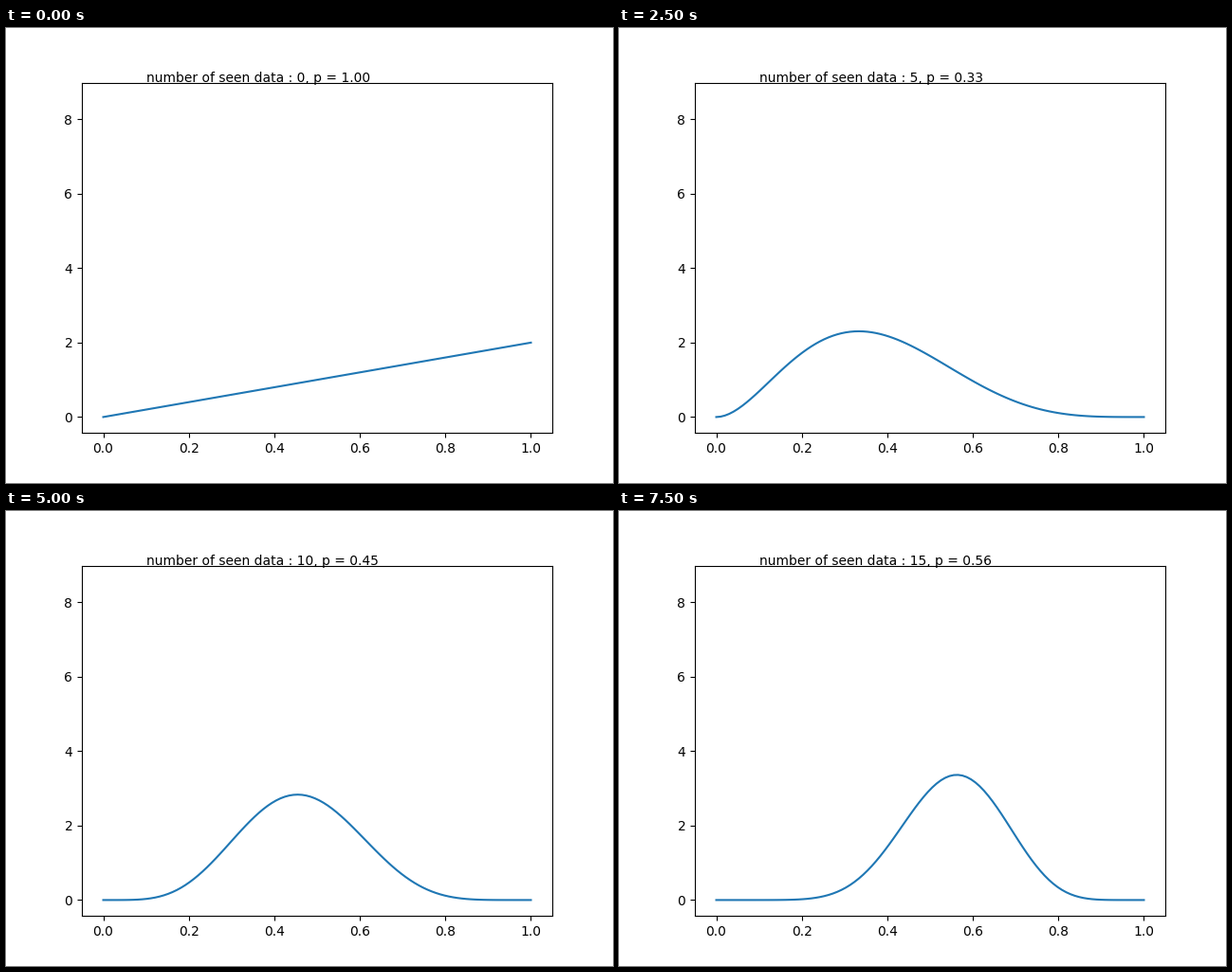
These frames come from a looping animation (640 by 480 pixels, 8 s). A matplotlib script:

```python
from math import factorial

import matplotlib.pyplot as plt
import numpy as np
from matplotlib.animation import FuncAnimation

FLIPS = "HTTHTTHHTTHHHTHH"
TOP = 8.56
x = np.linspace(0, 1, 100)


def posterior(heads, tails):
    """Beta density of the coin bias under a uniform prior."""
    scale = factorial(heads + tails + 1) / (factorial(heads) * factorial(tails))
    return scale * x**heads * (1 - x)**tails


fig, ax = plt.subplots(figsize=(6.4, 4.8), dpi=100)
ax.set_xlim(-0.05, 1.05)
ax.set_ylim(-0.05 * TOP, 1.05 * TOP)
line, = ax.plot(x, posterior(1, 0), color="#1f77b4", lw=1.5)
label = ax.text(0.1, 9, "", fontsize=10)


def update(i):
    heads = FLIPS[:i + 1].count("H")
    tails = i + 1 - heads
    line.set_ydata(posterior(heads, tails))
    label.set_text(f"number of seen data : {i}, p = {heads / (i + 1):.2f}")
    return line, label


anim = FuncAnimation(fig, update, frames=len(FLIPS), interval=500,
                     repeat=True, repeat_delay=0)
plt.show()
```
